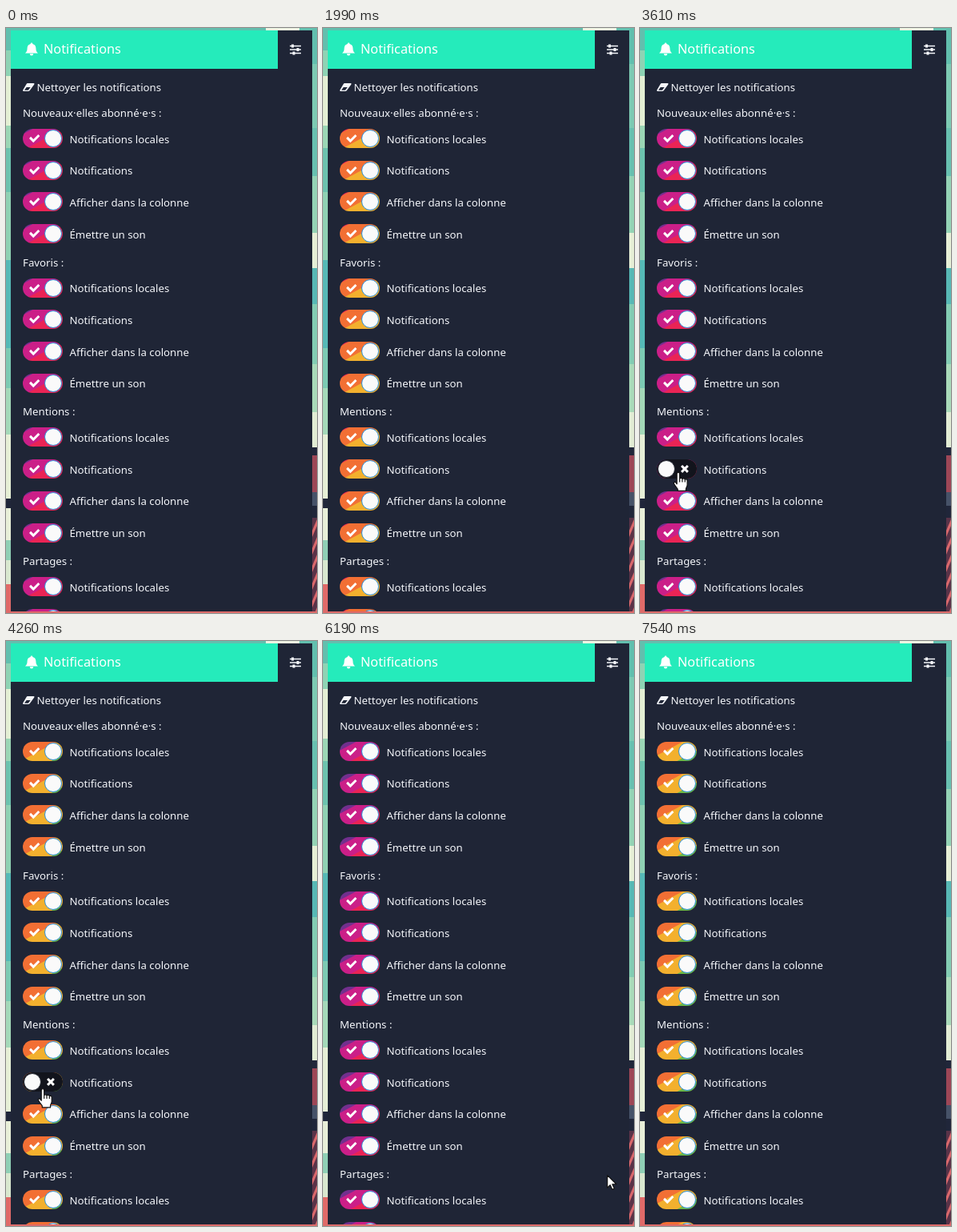
Write an HTML page that moves like this. It is 389x731 px and loops after 7640 ms.

```html
<!DOCTYPE html>
<html lang="fr">
<head>
<meta charset="utf-8">
<title>Notifications</title>
<style>
  html, body { margin: 0; width: 100%; height: 100%; overflow: hidden; background: #1f2637; }
  svg { display: block; width: 100%; height: 100%; }
  text { font: 13.25px "Noto Sans", "Open Sans", sans-serif; fill: #f4f6fa; }
  .title { font-size: 16.3px; fill: #fff; }
</style>
</head>
<body>
<svg viewBox="0 0 389 731" xmlns="http://www.w3.org/2000/svg">
  <defs>
    <linearGradient id="pride" gradientUnits="userSpaceOnUse"></linearGradient>
    <clipPath id="column"><rect x="6" y="3" width="377" height="726"/></clipPath>
  </defs>
  <rect width="389" height="731" fill="#62bfae"/>
  <g id="scenery"></g>
  <rect x="6" y="3" width="377" height="726" fill="#1f2536"/>
  <rect x="6" y="3" width="334" height="48" fill="#25ebbb"/>

  <path fill="#fff" d="M32 18.5c.9 0 1.4.6 1.4 1.5 2.6.6 4 2.6 4 5.3 0 3.2.8 4.7 2.6 6.2H24c1.8-1.5 2.6-3 2.6-6.2 0-2.7 1.4-4.7 4-5.3 0-.9.5-1.5 1.4-1.5zM29.8 32.300h4.400a2.200 2.200 0 0 1-4.400 0z"/>
  <text class="title" x="47" y="32">Notifications</text>
  <g stroke="#f4f6fa" stroke-width="1.5">
    <path d="M355 22.500h14M355 27h14M355 31.500h14"/>
    <path stroke-width="3" d="M358.500 20.500v4M365 25v4M360 29.500v4"/>
  </g>
  <path fill="#f4f6fa" d="M27 69h7.500q1.500 0 .8 1.400l-5.500 7.600q-.8 1-2 1H22q-1.500 0-.8-1.400l4.400-7.600q.5-1 1.400-1z"/>
  <path fill="#1f2536" d="M23 77.700l2.600-3.700h5l-2.800 3.700z"/>
  <text x="38.5" y="79">Nettoyer les notifications</text>

  <g id="settings" clip-path="url(#column)"></g>

  <g id="cursor" stroke="#111" stroke-width="1.2" stroke-linejoin="round" fill="#fff">
    <path id="arrow" d="M.5.5v15.500l3.600-3.400 2.500 5.600 2.600-1.100-2.500-5.500h5z"/>
    <path id="hand" d="M-.8 1.500C-.8-.8 2.700-.8 2.700 1.500V8c.3-1.700 3.200-1.600 3.300.3.500-1.400 3.200-1.200 3.300.6.700-1.100 2.900-.7 2.900 1.200v5.400c0 2-1.700 3.300-1.700 5.200v2.200H.3v-2c-1.400-2-3.600-4.700-4.700-7-.7-1.700 1.300-2.700 2.400-1.300l1.200 1.700zM2.700 8v4M6 8.300V12M9.300 8.900V12"/>
  </g>
</svg>
<script>
const LOOP = 7640;
const PERIOD = 3000;
const TROUGH = 400;
const RISE = 1080;
const TRAVEL = 50;
const BAND = 18;
const NORMAL = { x: 0.47, y: 0.883 };
const COLORS = ["#722f8e", "#cb1f88", "#ea2455", "#f26f34", "#f3b02e", "#6cb944", "#2d8fd0"];
const SECTIONS = ["Nouveaux·elles abonné·e·s :", "Favoris :", "Mentions :", "Partages :"];
const OPTIONS = ["Notifications locales", "Notifications", "Afficher dans la colonne", "Émettre un son"];
const SECTION_STEP = 186.7, ROW_STEP = 39.7;
const CLICK_OFF = 3400, CLICK_ON = 5000, SWITCH_TIME = 200;
const CHECK = "M19.26 7l-6 6-3.160-3.150L8 11.950l5.260 5.260 8.110-8.110z";
const CROSS = "M39.900 9.120L37.780 7l-2.830 2.830L32.120 7 30 9.120l2.830 2.830L30 14.780l2.120 2.120 2.830-2.830 2.830 2.830 2.120-2.120-2.830-2.830z";
const CURSOR_PATH = [
  [2480, 315, 735], [2700, 200, 650], [2900, 55, 552], [2990, 51, 546],
  [3250, 48, 553], [4260, 45, 560], [5560, 46, 558], [5850, 150, 600],
  [6190, 355, 667], [6330, 378, 690], [6450, 388, 735]
];

const byId = id => document.getElementById(id);
const clamp = v => Math.max(0, Math.min(1, v));
const smooth = v => v * v * (3 - 2 * v);
const wave = v => (1 - Math.cos(Math.PI * v)) / 2;

function add(parent, name, attrs, text) {
  const node = document.createElementNS("http://www.w3.org/2000/svg", name);
  for (const key in attrs) node.setAttribute(key, attrs[key]);
  if (text) node.textContent = text;
  parent.append(node);
  return node;
}

// Each band: [top, colour], running to the next one.
function paintStrip(x, width, bands) {
  bands.forEach(([y, fill], i) => {
    const end = i + 1 < bands.length ? bands[i + 1][0] : 731;
    add(byId("scenery"), "rect", { x, y, width, height: end - y, fill });
  });
}

function buildScenery() {
  const scenery = byId("scenery");
  paintStrip(0, 6, [
    [0, "#62bfae"], [28, "#8ed3b4"], [60, "#e4efd4"], [122, "#9bd6b5"], [150, "#6cc2ae"],
    [205, "#8fd1b3"], [290, "#55b9b6"], [400, "#7ccab3"], [450, "#a4d9b9"], [508, "#e6efd6"],
    [588, "#20263a"], [600, "#e8efd8"], [640, "#8fcfb5"], [665, "#d9e8cf"], [695, "#e06a68"]
  ]);
  paintStrip(383, 6, [
    [0, "#62bfae"], [45, "#7dcab3"], [125, "#68c0b0"], [185, "#94d3b5"], [256, "#e6efd6"],
    [300, "#57b8b5"], [345, "#83ccb3"], [420, "#a9dab9"], [480, "#e2ecd4"], [524, "#20263a"],
    [534, "#9d4656"], [580, "#465268"], [597, "#20263a"], [612, "#5a3348"]
  ]);
  for (let y = 622; y < 735; y += 22) {
    add(scenery, "path", { d: `M383 ${y + 6}l6-14v8l-6 14z`, fill: "#d9686c" });
  }
  add(scenery, "rect", { x: 325, y: 0, width: 42, height: 3, fill: "#eef4e2" });
  add(scenery, "rect", { x: 0, y: 729, width: 389, height: 2, fill: "#dc6b6a" });
}

function buildGradient() {
  const length = BAND * COLORS.length;
  const pride = byId("pride");
  add(pride, "stop", { offset: 0, "stop-color": COLORS[0] });
  for (let i = 1; i < COLORS.length; i++) {
    const edge = i * BAND;
    add(pride, "stop", { offset: (edge - 0.5) / length, "stop-color": COLORS[i - 1] });
    add(pride, "stop", { offset: (edge + 0.5) / length, "stop-color": COLORS[i] });
  }
}

function buildToggle(x, y) {
  const g = add(byId("settings"), "g", { transform: `translate(${x} ${y})` });
  const track = { width: 50, height: 24, rx: 12 };
  add(g, "rect", { ...track, fill: "url(#pride)" });
  const check = add(g, "path", { d: CHECK, fill: "#fff" });
  const off = add(g, "g", { opacity: 0 });
  add(off, "rect", { ...track, fill: "#12141c" });
  add(off, "path", { d: CROSS, fill: "#fff" });
  const knob = add(g, "circle", { cx: 38, cy: 12, r: 10.5, fill: "#fafafa", stroke: "#2b90d9" });
  return { check, off, knob };
}

function buildSettings() {
  let clicked;
  SECTIONS.forEach((title, s) => {
    const top = s * SECTION_STEP;
    add(byId("settings"), "text", { x: 21, y: Math.round(110.8 + top) }, title);
    OPTIONS.forEach((label, i) => {
      const y = 126 + top + i * ROW_STEP;
      if (y > 731) return;
      const toggle = buildToggle(21, Math.round(y));
      add(byId("settings"), "text", { x: 79.5, y: Math.floor(y + 18.1) }, label);
      if (s === 2 && i === 1) clicked = toggle;
    });
  });
  return clicked;
}

function cursorAt(t) {
  const next = CURSOR_PATH.findIndex(p => p[0] > t);
  if (next < 1) return null;
  const [t0, x0, y0] = CURSOR_PATH[next - 1];
  const [t1, x1, y1] = CURSOR_PATH[next];
  const k = (t - t0) / (t1 - t0);
  return { x: x0 + (x1 - x0) * k, y: y0 + (y1 - y0) * k };
}

// The rainbow glides forward quickly and returns more slowly.
function swingAt(t) {
  const phase = (t - TROUGH + PERIOD) % PERIOD;
  return phase < RISE ? wave(phase / RISE) : wave((PERIOD - phase) / (PERIOD - RISE));
}

function drawGradient(t) {
  const start = 11 - BAND - TRAVEL * swingAt(t);
  const end = start + BAND * COLORS.length;
  const points = { x1: start * NORMAL.x, y1: start * NORMAL.y, x2: end * NORMAL.x, y2: end * NORMAL.y };
  for (const key in points) byId("pride").setAttribute(key, points[key]);
}

function drawSwitch(t) {
  const off = smooth(clamp((t - CLICK_OFF) / SWITCH_TIME)) - smooth(clamp((t - CLICK_ON) / SWITCH_TIME));
  clicked.off.setAttribute("opacity", off);
  clicked.check.setAttribute("opacity", 1 - off);
  clicked.knob.setAttribute("cx", 38 - 26 * off);
  clicked.knob.setAttribute("stroke", off > 0.5 ? "#282c37" : "#2b90d9");
}

function drawCursor(t) {
  const pos = cursorAt(t);
  byId("cursor").setAttribute("visibility", pos ? "visible" : "hidden");
  if (!pos) return;
  const pointing = pos.x < 71;
  byId("cursor").setAttribute("transform", `translate(${pos.x} ${pos.y})`);
  byId("hand").setAttribute("display", pointing ? "inline" : "none");
  byId("arrow").setAttribute("display", pointing ? "none" : "inline");
}

function draw(t) {
  drawGradient(t);
  drawSwitch(t);
  drawCursor(t);
}

buildScenery();
buildGradient();
const clicked = buildSettings();
const began = performance.now();
function tick() {
  draw((performance.now() - began) % LOOP);
  requestAnimationFrame(tick);
}
tick();
</script>
</body>
</html>
```
